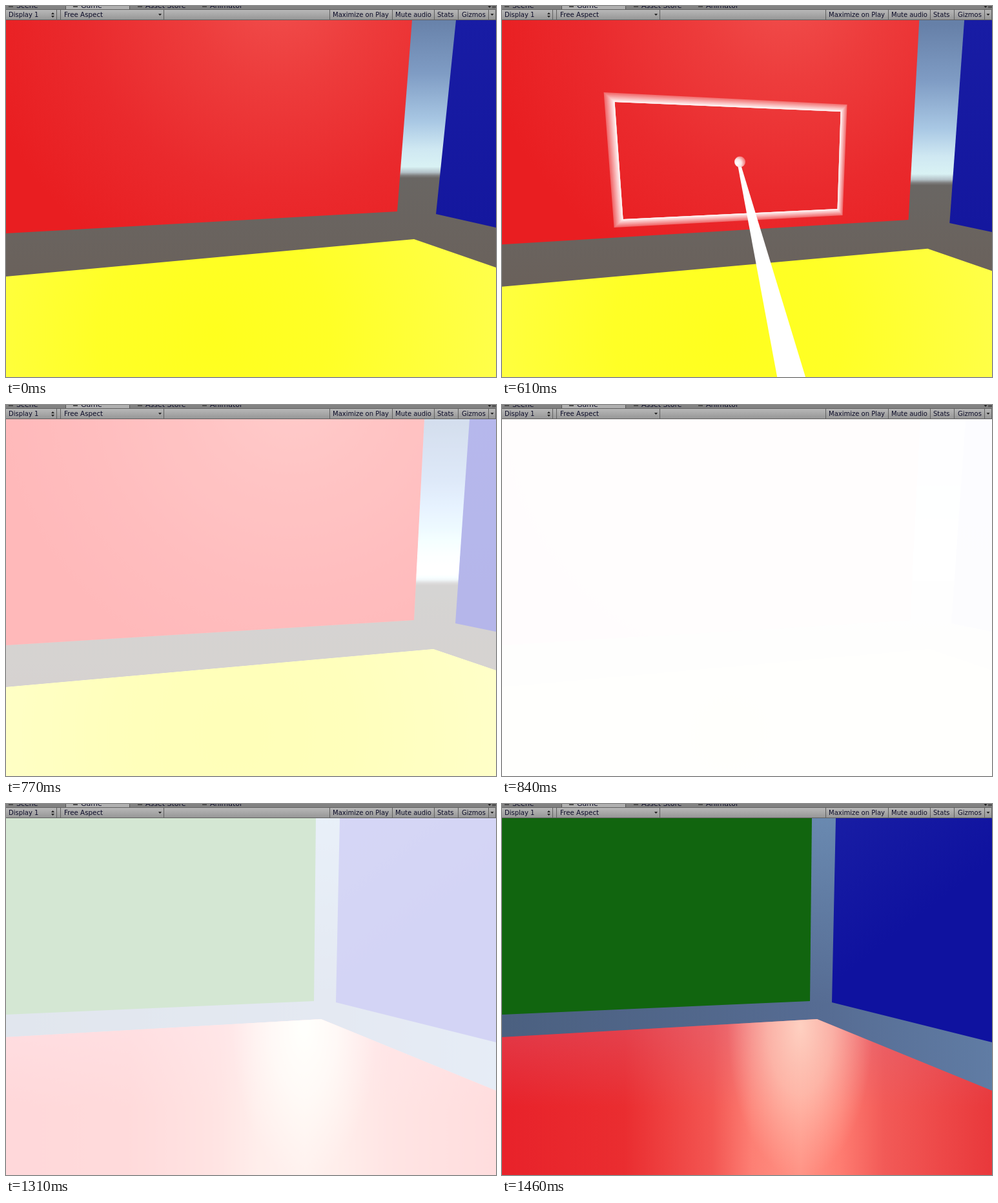
Write an HTML page with a canvas that moves like this. It is 759 px wide and 576 px high and loops after 1540 ms.

```html
<!DOCTYPE html>
<html lang="en">
<head>
<meta charset="utf-8">
<title>Teleport in a coloured room</title>
<style>
  html, body { margin: 0; width: 100%; height: 100%; overflow: hidden; background: #000; }
  canvas { display: block; }
</style>
</head>
<body>
<canvas id="stage" width="759" height="576"></canvas>
<script>
const W = 759, H = 576, TOP = 22, LOOP = 1540;
const TICK = 77.15;              // about 13 pictures per second, shown on whole 10 ms marks
const LASER_ON = 150, LASER_OFF = 690, ARRIVAL = 1310;
const ctx = document.getElementById('stage').getContext('2d');

const clamp = (v, lo, hi) => Math.min(hi, Math.max(lo, v));
const mixPoints = (a, b, u) => a.map(([x, y], i) => [x + (b[i][0] - x) * u, y + (b[i][1] - y) * u]);

function trace(points) {
  points.forEach(([x, y], i) => i ? ctx.lineTo(x, y) : ctx.moveTo(x, y));
  ctx.closePath();
}

function poly(points, fill) {
  ctx.beginPath();
  trace(points);
  ctx.fillStyle = fill;
  ctx.fill();
}

function rect(x, y, w, h, fill) {
  ctx.fillStyle = fill;
  ctx.fillRect(x, y, w, h);
}

function withStops(gradient, stops) {
  stops.forEach(([at, color]) => gradient.addColorStop(at, color));
  return gradient;
}
const linear = (x0, y0, x1, y1, ...stops) => withStops(ctx.createLinearGradient(x0, y0, x1, y1), stops);
const radial = (x, y, r, ...stops) => withStops(ctx.createRadialGradient(x, y, 0, x, y, r), stops);

// The view pans evenly and tilts with a slow start; points slide by their own parallax.
function cameraAt(t) {
  const pan = clamp(t / 670, 0, 1), tilt = pan ** 1.5;
  return (x, y, dx, dy) => [x + dx * pan, y + dy * tilt];
}

function drawYellowRoom(move) {
  const horizon = move(0, 262, 0, 13)[1];
  const wallTop = move(629, TOP, 19, 0);
  const floorCorner = move(632, 362, 30, 17);

  rect(0, TOP, W, H, linear(0, horizon - 245, 0, horizon + 5,
    [0, '#6680a8'], [.35, '#7f9cc4'], [.65, '#a9c8e4'], [.82, '#cfe8f2'],
    [.93, '#d9f2f4'], [.965, '#b4c2c8'], [.985, '#7e7e7e'], [1, '#696663']));
  rect(0, horizon + 5, W, H, linear(0, horizon, 0, 430, [0, '#696663'], [1, '#6a615b']));

  poly([[0, TOP], wallTop, move(606, 319, 26, 15), move(0, 353, 0, 20)],
    radial(wallTop[0] - 205, -25, 480, [0, '#f14f4d'], [.3, '#ed3c3c'], [.65, '#ea2a2d'], [1, '#e91e21']));
  poly([move(697, TOP, 21, 0), [W, TOP], move(W, 344, 0, 8), move(666, 323, 30, 16)],
    linear(0, TOP, 0, 340, [0, '#181ca4'], [1, '#14179e']));
  poly([move(0, 420, 0, 18), floorCorner, move(W, 406, 0, 6), [W, H], [0, H]],
    radial(floorCorner[0] - 310, 510, 440, [0, '#ffff1e'], [.4, '#ffff26'], [1, '#ffff4a']));
}

// Stacked rings: their combined opacity falls evenly outwards and ends at a faint rim.
function drawMarker(inner, outer) {
  const layers = 16, rim = .3;
  for (let k = 1; k <= layers; k++) {
    ctx.beginPath();
    trace(inner);
    trace(mixPoints(inner, outer, k / layers));
    ctx.fillStyle = `rgba(255,255,255,${k < layers ? 1 / (k + 1) : rim})`;
    ctx.fill('evenodd');
  }
}

function drawLaser(move) {
  ctx.save();
  ctx.translate(...move(0, 0, 16, 7));
  drawMarker([[160, 143], [510, 158], [505, 309], [173, 325]],
             [[143, 128], [520, 147], [513, 319], [159, 338]]);
  poly([[350, 238], [354, 236], [461, 588], [415, 588]], '#fff');
  ctx.beginPath();
  ctx.arc(354, 236, 8.5, 0, 2 * Math.PI);
  ctx.fillStyle = radial(350, 238, 14, [0, '#fff'], [.45, '#fbe4e4'], [1, 'rgba(242,110,110,.8)']);
  ctx.fill();
  ctx.restore();
}

function drawRedRoom() {
  rect(0, TOP, W, H, linear(0, 0, W, 0, [0, '#4b6080'], [.66, '#566c93'], [1, '#607ca4']));
  rect(478, TOP, 42, 290, linear(0, TOP, 0, 310, [0, 'rgba(112,147,186,.75)'], [1, 'rgba(112,147,186,0)']));
  poly([[0, TOP], [480, TOP], [477, 306], [0, 327]], '#11650f');
  poly([[517, TOP], [W, TOP], [W, 370], [511, 308]],
    linear(517, TOP, 640, 180, [0, '#181da4'], [1, '#0f129f']));

  const floor = [[0, 362], [488, 334], [W, 445], [W, H], [0, H]];
  poly(floor, linear(0, 0, W, 0, [0, '#e8222a'], [.25, '#ea2d30'], [.43, '#f35652'],
    [.51, '#fd7f74'], [.61, '#ff9385'], [.69, '#fe7c71'], [.78, '#f25a57'], [1, '#e9383b']));
  poly(floor, linear(0, 350, 0, 470, [0, 'rgba(215,105,135,.32)'], [1, 'rgba(215,105,135,0)']));

  ctx.save();
  ctx.beginPath();
  trace(floor);
  ctx.clip();
  ctx.translate(462, 345);
  ctx.scale(.48, 1);
  rect(-300, -300, 600, 600, radial(0, 0, 235,
    [0, 'rgba(255,212,196,.95)'], [.45, 'rgba(255,205,188,.65)'], [1, 'rgba(255,190,175,0)']));
  ctx.restore();
}

// Colours overexpose a little while the white veil covers them.
function drawFade(amount) {
  const glow = Math.round(255 * .25 * amount);
  ctx.globalCompositeOperation = 'color-dodge';
  rect(0, TOP, W, H, `rgb(${glow},${glow},${glow})`);
  ctx.globalCompositeOperation = 'source-over';
  rect(0, TOP, W, H, `rgba(255,255,255,${amount})`);
}

function label(text, x, y, size) {
  ctx.font = `${size}px "DejaVu Sans", sans-serif`;
  ctx.fillStyle = '#0c0c28';
  ctx.fillText(text, x, y);
}

function arrow(x, y, dir) {
  poly([[x - 2.5, y], [x + 2.5, y], [x, y + 3 * dir]], '#222');
}

function drawToolbar() {
  rect(0, 0, W, 5, '#828282');
  rect(92, 0, 100, 5, '#555');
  rect(93, 0, 98, 5, '#b0b0b0');
  ['Scene', 'Game', 'Asset Store', 'Animator'].forEach((text, i) => {
    rect(4 + 100 * i, 0, 7, 2, '#4c4c4c');
    label(text, 16 + 100 * i, 3, 11);
  });
  arrow(749, 0, 1);
  [0, 2].forEach(y => rect(753, y, 6, 1, '#333'));

  rect(0, 5, W, 17, linear(0, 5, 0, 21, [0, '#bababa'], [1, '#979797']));
  [5, 21].forEach(y => rect(0, y, W, 1, '#606060'));
  [78, 84, 244, 501, 598, 663, 700, 747, 758].forEach(x => rect(x, 6, 1, 15, '#606060'));
  label('Display 1', 4, 17, 10);
  label('Free Aspect', 90, 17, 10.3);
  label('Maximize on Play', 506, 17, 10);
  label('Mute audio', 603, 17, 10);
  label('Stats', 668, 17, 10);
  label('Gizmos', 706, 17, 10);
  arrow(72.5, 13, -1);
  arrow(72.5, 15, 1);
  arrow(238.5, 12, 1);
  arrow(753, 12, 1);
}

function draw(t) {
  const arrived = t >= ARRIVAL;
  const move = cameraAt(t);
  if (arrived) drawRedRoom();
  else drawYellowRoom(move);
  if (t >= LASER_ON && t < LASER_OFF) drawLaser(move);

  const fade = arrived ? .815 - (t - ARRIVAL) / 170 : (t - 634) / 200;
  if (fade > 0) drawFade(Math.min(fade, .987));
  drawToolbar();
}

const floorTo10 = ms => Math.floor(ms / 10) * 10;
const start = performance.now();
function tick() {
  const t = (performance.now() - start) % LOOP;
  const step = Math.floor((floorTo10(t) + 9.99) / TICK);
  draw(floorTo10(step * TICK));
  requestAnimationFrame(tick);
}
tick();
</script>
</body>
</html>
```
